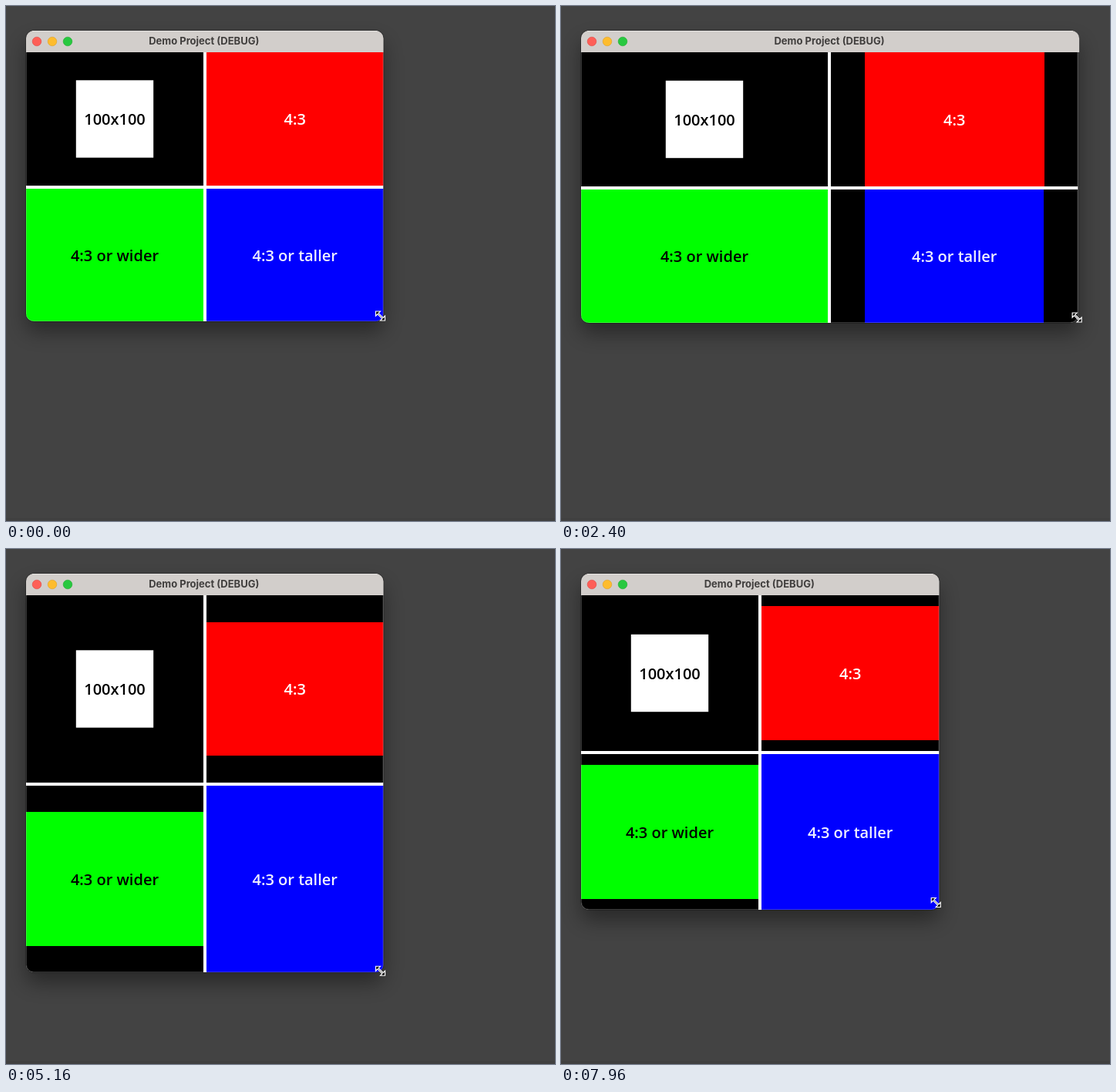
These frames come from a looping animation (712x668 px, 8 s). An HTML page:

```html
<!DOCTYPE html>
<html lang="en">
<head>
<meta charset="utf-8">
<title>Aspect ratio demo</title>
<style>
  html, body { margin: 0; width: 100%; height: 100%; overflow: hidden; background: #434343; }
  svg { display: block; }
  text { text-anchor: middle; font: 600 20px "Open Sans", sans-serif; }
  #title { font: 700 13px Inter, sans-serif; fill: #403e3d; }
</style>
</head>
<body>
<svg width="712" height="668" viewBox="0 0 712 668">
  <defs>
    <filter id="blur" filterUnits="userSpaceOnUse" x="-60" y="-60" width="860" height="860">
      <feGaussianBlur stdDeviation="13"/>
    </filter>
    <clipPath id="clip"><rect id="clipBox" x="26" y="32" rx="10"/></clipPath>
  </defs>
  <rect width="712" height="668" fill="#434343"/>
  <rect y="664" width="712" height="4" fill="#404040"/>
  <rect id="shadow" x="26" y="46" rx="12" fill="#000" opacity=".38" filter="url(#blur)"/>
  <rect id="edge" x="25.5" y="31.5" rx="10.5" fill="none" stroke="#000" stroke-opacity=".25"/>
  <g clip-path="url(#clip)">
    <rect id="grid" x="26" y="60" fill="#fff"/>
    <g id="cells"></g>
    <rect id="rim" x="26.5" y="32.5" rx="9.5" fill="none" stroke="#fff" stroke-opacity=".2"/>
  </g>
  <path id="bar" fill="#d2cecb"/>
  <path id="shine" fill="none" stroke="#e4e1df"/>
  <g stroke-width=".6">
    <circle cx="40" cy="46" r="5.8" fill="#fe5f57" stroke="#e14640"/>
    <circle cx="60" cy="46" r="5.8" fill="#febc2e" stroke="#dfa023"/>
    <circle cx="80" cy="46" r="5.8" fill="#28c840" stroke="#1dad2b"/>
  </g>
  <text id="title" y="50">Demo Project (DEBUG)</text>
  <path id="cursor" fill="#000" stroke="#fff" stroke-width="1.2"
    d="M-6-6H0L-2.4-3.6L3.6 2.4L6 0V6H0L2.4 3.6L-3.6-2.4L-6 0Z"/>
</svg>
<script>
const LOOP = 8000, LEFT = 26, TOP = 32, BODY = 60, GAP = 4, LAG = 40, RATIO = 4 / 3;

// [ms, position] of the window's right and bottom edges
const rightAt = curve([
  [0, 489.5], [540, 489.5], [700, 500], [1370, 576.5], [1760, 621], [2200, 661.5],
  [2480, 673.5], [2690, 673.5], [2850, 656], [3100, 606.5], [3460, 561], [3960, 510.5],
  [4330, 497], [4700, 490.5], [5160, 489.5], [5800, 493.5], [6000, 492.5], [6640, 492.5],
  [7200, 493.5], [7960, 490.5], [8050, 490]
]);
const bottomAt = curve([
  [0, 409], [700, 409], [1330, 410], [1760, 410], [2160, 411], [3100, 411], [3460, 410],
  [3960, 409], [4380, 409], [4700, 462], [5160, 549], [5600, 594], [5960, 622.5],
  [6640, 622.5], [6900, 610], [7200, 569], [7440, 520], [7960, 468], [8050, 464]
]);
// The pointer rests slightly higher before the upward drag
const nudgeAt = curve([[0, 0], [6199, 0], [6200, -7], [6640, -7], [6900, 0], [8050, 0]]);

// Monotone cubic through the given points
function curve(p) {
  const slope = i => (p[i + 1][1] - p[i][1]) / (p[i + 1][0] - p[i][0]);
  const tangent = p.map((_, i) => {
    if (!i || i === p.length - 1) return 0;
    const a = slope(i - 1), b = slope(i);
    return a * b > 0 ? 2 * a * b / (a + b) : 0;
  });
  return t => {
    t = Math.max(0, Math.min(t, p[p.length - 1][0]));
    let i = 0;
    while (i < p.length - 2 && t >= p[i + 1][0]) i++;
    const h = p[i + 1][0] - p[i][0], u = (t - p[i][0]) / h, v = 1 - u;
    return v * v * (1 + 2 * u) * p[i][1] + u * u * (3 - 2 * u) * p[i + 1][1]
      + h * u * v * (v * tangent[i] - u * tangent[i + 1]);
  };
}

const $ = id => document.getElementById(id);
const set = (el, attrs) => { for (const k in attrs) el.setAttribute(k, attrs[k]); };
const box = (el, x, y, width, height) => set(el, { x, y, width, height });

function add(tag, attrs) {
  const el = document.createElementNS("http://www.w3.org/2000/svg", tag);
  set(el, attrs);
  return $("cells").appendChild(el);
}

const cells = [
  { label: "100x100", fill: "#fff", ink: "#000", fit: () => [100.4, 100.4] },
  { label: "4:3", fill: "#f00", ink: "#fff", snap: true,
    fit: (w, h) => [Math.min(w, h * RATIO), Math.min(h, w / RATIO)] },
  { label: "4:3 or wider", fill: "#0f0", ink: "#000", snap: true,
    fit: (w, h) => [w, Math.min(h, w / RATIO)] },
  { label: "4:3 or taller", fill: "#00f", ink: "#f0f0ff", snap: true,
    fit: (w, h) => [Math.min(w, h * RATIO), h] }
];
for (const c of cells) {
  c.back = add("rect", { fill: "#000" });
  c.panel = add("rect", { fill: c.fill });
  c.text = add("text", { fill: c.ink });
  c.text.textContent = c.label;
}

function layout(cell, x0, y0, x1, y1) {
  const cx = (x0 + x1) / 2, cy = (y0 + y1) / 2;
  const [w, h] = cell.fit(x1 - x0, y1 - y0);
  let l = cx - w / 2, t = cy - h / 2, r = cx + w / 2, b = cy + h / 2;
  if (cell.snap) {
    l = Math.max(x0, Math.floor(l));
    t = Math.max(y0, Math.floor(t));
    r = Math.min(x1, Math.ceil(r));
    b = Math.min(y1, Math.ceil(b));
  }
  box(cell.back, x0, y0, x1 - x0, y1 - y0);
  box(cell.panel, l, t, r - l, b - t);
  set(cell.text, { x: cx, y: cy + 7.7 });
}

function draw(t) {
  const right = rightAt(t), bottom = bottomAt(t);
  const inner = Math.min(right, rightAt(t - LAG)); // content trails a widening frame
  const w = right - LEFT, iw = inner - LEFT, h = bottom - TOP;

  box($("shadow"), LEFT, TOP + 14, w, h);
  box($("edge"), LEFT - .5, TOP - .5, iw + 1, h + 1);
  box($("clipBox"), LEFT, TOP, iw, h);
  box($("grid"), LEFT, BODY, iw, bottom - BODY);
  box($("rim"), LEFT + .5, TOP + .5, iw - 1, h - 1);

  const x1 = Math.round(LEFT + (iw - GAP) / 2), y1 = Math.round(BODY + (bottom - BODY - GAP) / 2);
  const xs = [[LEFT, x1], [x1 + GAP, inner]], ys = [[BODY, y1], [y1 + GAP, bottom]];
  cells.forEach((c, i) => {
    const [l, r] = xs[i % 2], [a, b] = ys[i >> 1];
    layout(c, l, a, r, b);
  });

  set($("bar"), { d: `M${LEFT} ${BODY}V42a10 10 0 0 1 10-10H${right - 10}a10 10 0 0 1 10 10V${BODY}Z` });
  set($("shine"), { d: `M${LEFT + 8} ${TOP + .5}H${right - 8}` });
  set($("title"), { x: (LEFT + right) / 2 - 1 });

  const px = rightAt(t + LAG) - 4, py = bottomAt(t + LAG) - 7 + nudgeAt(t);
  set($("cursor"), { transform: `translate(${px} ${py})` });
}

const start = performance.now();
function tick() {
  draw((performance.now() - start) % LOOP);
  requestAnimationFrame(tick);
}
tick();
</script>
</body>
</html>
```
